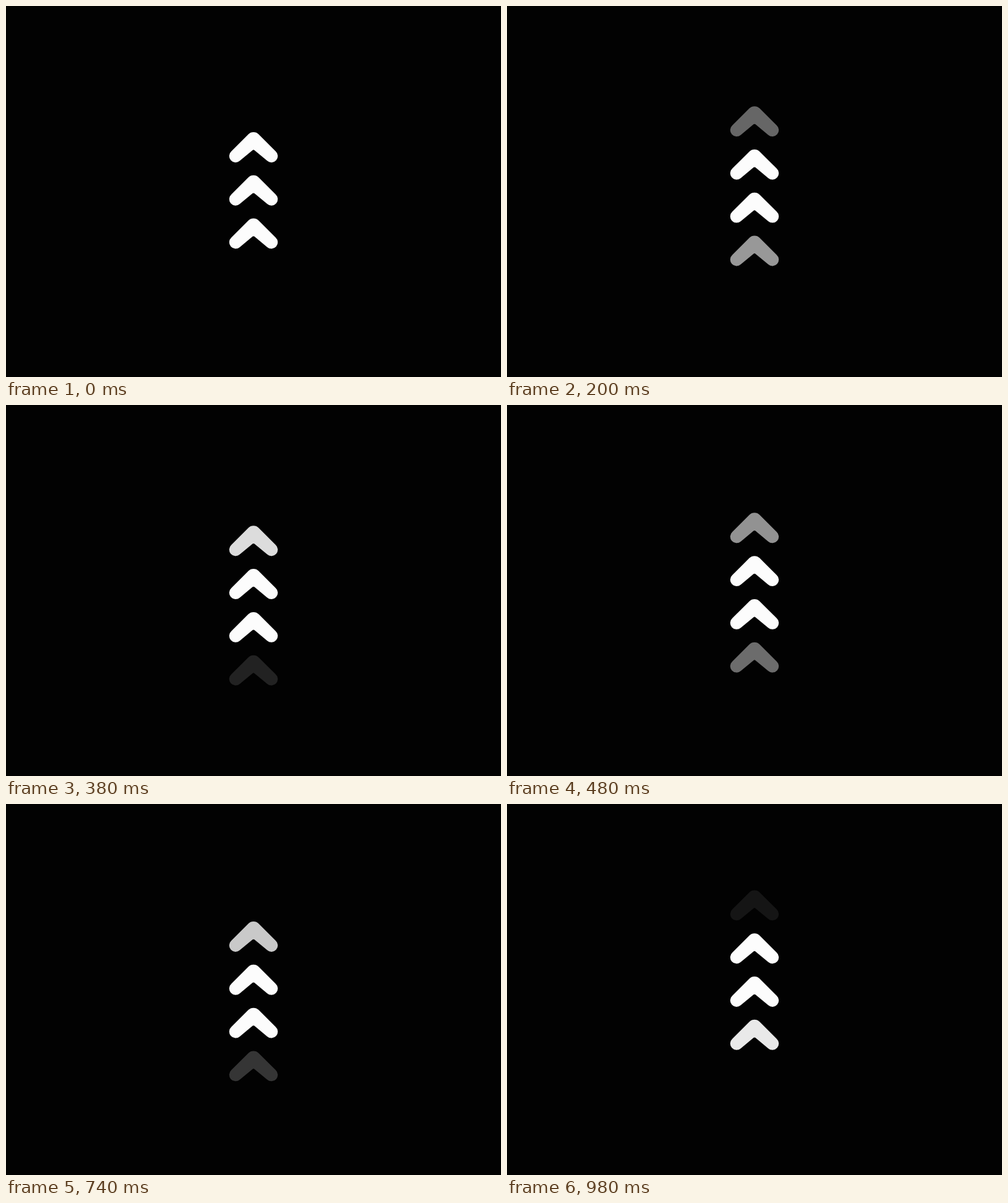
These frames come from a looping animation (800x600 px, 1 s). An HTML page:

```html
<!DOCTYPE html>
<html lang="en">
<head>
<meta charset="utf-8">
<title>Rising chevrons</title>
<style>
  html, body { margin: 0; width: 100%; height: 100%; overflow: hidden; background: #020202; }
  svg { display: block; width: 800px; height: 600px; }
</style>
</head>
<body>
<svg viewBox="0 0 800 600" fill="#fcfcfc">
  <defs>
    <path id="chevron" d="M364.2 234.9 L391.66 207.46 A11.8 11.8 0 0 1 408.34 207.46 L435.8 234.9
      A10.3 10.3 0 0 1 422.1 250.3 L401.5 233.2 Q400 232 398.5 233.2 L377.9 250.3
      A10.3 10.3 0 0 1 364.2 234.9 Z"/>
  </defs>
  <use href="#chevron"/>
  <use href="#chevron"/>
  <use href="#chevron"/>
  <use href="#chevron"/>
</svg>
<script>
  const LOOP = 1000, STEP = 20, GAP = 69.8;
  const TICKS = 40; // motion ticks per cycle, 120 per second
  const arrows = [...document.querySelectorAll('use')];

  function draw(ms) {
    const step = Math.floor((ms % LOOP) / STEP + 1e-6);
    const tick = Math.floor(step * 12 / 5);
    const phase = (tick % TICKS) / TICKS;
    arrows.forEach((arrow, i) => {
      arrow.setAttribute('transform', `translate(0 ${(i - phase) * GAP})`);
      arrow.setAttribute('opacity', i === 0 ? 1 - phase : i === 3 ? phase : 1);
    });
  }

  let start = null;
  function frame(now) {
    if (start === null) start = now;
    draw(Math.max(0, now - start));
    requestAnimationFrame(frame);
  }
  draw(0);
  requestAnimationFrame(frame);
</script>
</body>
</html>
```
